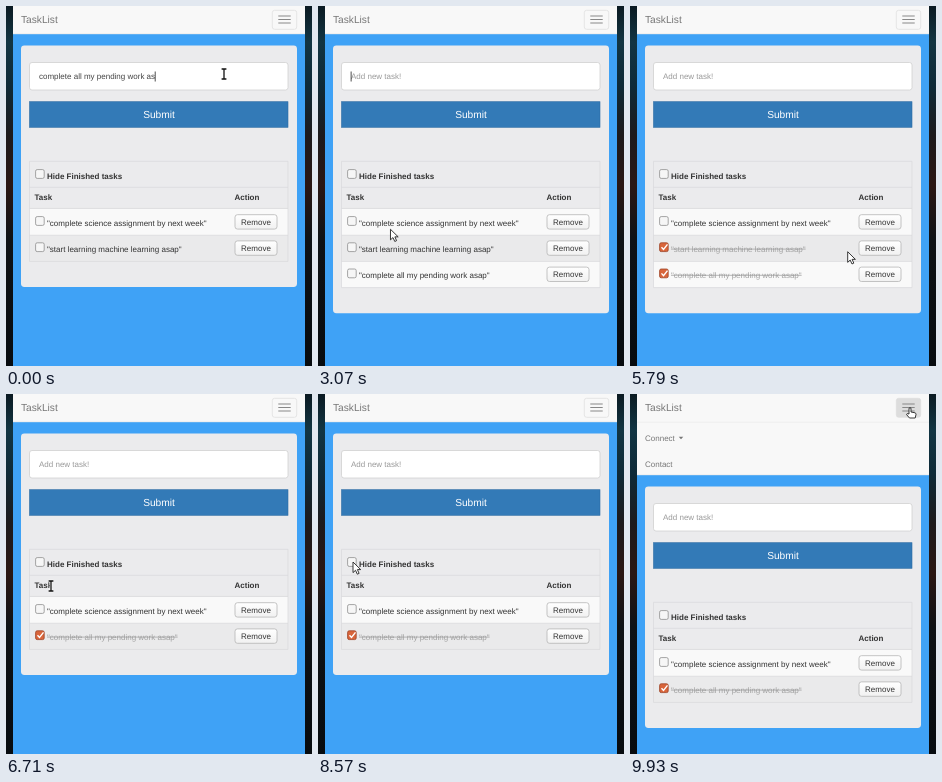
Recreate the animation shown at these times as an HTML page. Size 306 by 360 pixels, loop 10 s.

```html
<!DOCTYPE html>
<html lang="en">
<head>
<meta charset="utf-8">
<title>TaskList</title>
<style>
html, body { margin: 0; width: 100%; height: 100%; overflow: hidden; background: #0b1419; }
svg { display: block; width: 306px; height: 360px; }
text { font: 8px "Liberation Sans", Arial, sans-serif; fill: #333; text-rendering: geometricPrecision; white-space: pre; }
.big { font-size: 10.2px; }
.bold { font-weight: bold; }
.nav { fill: #777; }
</style>
</head>
<body>
<svg viewBox="0 0 306 360" xmlns="http://www.w3.org/2000/svg">
  <defs>
    <linearGradient id="sky" x1="0" y1="0" x2="0" y2="1">
      <stop offset="0" stop-color="#0b1a22"/>
      <stop offset=".1" stop-color="#123543"/>
      <stop offset=".22" stop-color="#0e2a38"/>
      <stop offset=".36" stop-color="#1d1a1c"/>
      <stop offset=".5" stop-color="#2a1714"/>
      <stop offset=".65" stop-color="#0e1216"/>
      <stop offset="1" stop-color="#070b0f"/>
    </linearGradient>
    <linearGradient id="btn" x1="0" y1="0" x2="0" y2="1">
      <stop offset="0" stop-color="#fff"/>
      <stop offset="1" stop-color="#f1f1f1"/>
    </linearGradient>
    <clipPath id="navClip"><rect id="navClipBox" x="7" y="0" width="292" height="28"/></clipPath>
  </defs>

  <rect width="306" height="360" fill="url(#sky)"/>
  <rect x="7" width="292" height="360" fill="#3fa2f6"/>

  <g id="page">
    <rect id="card" x="15" y="39.5" width="276" height="241.5" rx="3.4" fill="#ebebed"/>
    <rect x="23.5" y="56.5" width="258.5" height="27.5" rx="2.5" fill="#fff" stroke="#ccc" stroke-width=".7"/>
    <text id="entry" x="33" y="73"></text>
    <rect id="caret" y="65.5" width=".8" height="10" fill="#222"/>
    <rect x="23.5" y="95.7" width="258.5" height="25.6" fill="#337ab7" stroke="#2e6da4" stroke-width=".6"/>
    <text class="big" x="153" y="111.8" text-anchor="middle" style="fill:#fff">Submit</text>
    <text class="bold" x="41" y="172.7">Hide Finished tasks</text>
    <text class="bold" x="28.5" y="194">Task</text>
    <text class="bold" x="228.5" y="194">Action</text>
    <g id="rows"></g>
    <path id="grid" fill="none" stroke="#d9d9db" stroke-width=".7"/>
    <g id="hideBox"></g>
  </g>

  <rect id="navBar" x="7" width="292" height="28" fill="#f8f8f8"/>
  <rect id="navEdge" x="7" width="292" height=".6" fill="#e7e7e7"/>
  <text class="big nav" x="15" y="17">TaskList</text>
  <g clip-path="url(#navClip)">
    <path d="M7 28.2H299" stroke="#e7e7e7" stroke-width=".6"/>
    <text class="nav" x="15" y="46.6">Connect</text>
    <path d="M48.7 42.8h4.6l-2.3 2.4z" fill="#777"/>
    <text class="nav" x="15" y="73">Contact</text>
  </g>
  <rect id="toggle" x="266.3" y="4.3" width="24.4" height="19" rx="2.3" stroke="#ddd" stroke-width=".7"/>
  <path d="M272.3 10h12.4M272.3 13.5h12.4M272.3 17h12.4" stroke="#888" stroke-width="1.2"/>

  <g id="pointer">
    <path id="arrow" d="M0 0V10.6L2.5 8.3 4.3 12.2 6.1 11.4 4.4 7.6H7.7Z" fill="#fff" stroke="#222" stroke-width=".9" stroke-linejoin="round"/>
    <g id="beam" fill="none">
      <path d="M-2.4-5H2.4M0-5V5M-2.4 5H2.4" stroke="#fff" stroke-width="2.4"/>
      <path d="M-2.4-5H2.4M0-5V5M-2.4 5H2.4" stroke="#111" stroke-width="1.3"/>
    </g>
    <path id="hand" d="M-1 1Q-1-.5 0-.5T1 1V4L5 4.8Q6 5 6 6.5L5.2 10H-.5L-3.5 6.5Q-3.6 5-1 6Z" fill="#fff" stroke="#222" stroke-width=".9" stroke-linejoin="round"/>
  </g>
</svg>
<script>
const $ = id => document.getElementById(id);
const LOOP = 10000, ROW_TOP = 203, ROW = 26.2;
const FULL = "complete all my pending work asap";
const TASKS = ["complete science assignment by next week", "start learning machine learning asap", FULL];

// moments of user actions, ms
const AT = { a: 140, p: 320, enter: 640, blur: 3200, check2: 3900, check3: 4930,
             remove: 6100, hide: 7920, show: 8420, menu: 9640 };

// pointer stops: time, x, y
const STOPS = [
  [0, 218, 68], [1700, 218, 68], [2600, 110, 205], [3550, 34, 242], [4200, 34, 242],
  [4570, 44, 260], [4800, 35, 267], [5300, 35, 267], [5950, 250, 242], [6200, 250, 242],
  [6710, 45, 192], [7000, 38, 168.5], [7720, 38, 168.5], [7850, 35, 168], [8600, 35, 168],
  [9350, 282, 13], [9710, 282, 13], [9850, 280, 14], [LOOP, 280, 14]
];

const smooth = u => u * u * (3 - 2 * u);
const clamp = u => Math.max(0, Math.min(1, u));
const set = (el, attrs) => { for (const k in attrs) el.setAttribute(k, attrs[k]); };
const inside = (p, x0, y0, x1, y1) => p.x >= x0 && p.x <= x1 && p.y >= y0 && p.y <= y1;

function pointerAt(t) {
  let i = 1;
  while (i < STOPS.length - 1 && t > STOPS[i][0]) i++;
  const [t0, x0, y0] = STOPS[i - 1], [t1, x1, y1] = STOPS[i];
  const u = smooth(clamp((t - t0) / (t1 - t0)));
  return { x: x0 + (x1 - x0) * u, y: y0 + (y1 - y0) * u };
}

function checkbox(y, on) {
  const box = `<rect x="29.6" y="${y - 4.4}" width="8.6" height="8.8" rx="1.6" fill="${on ? "#d9653b" : "#f6f6f6"}" stroke="${on ? "#9c4527" : "#8e8e8e"}" stroke-width=".8"/>`;
  return on ? box + `<path d="M31.5 ${y}l2 2.2 4-5" fill="none" stroke="#fff" stroke-width="1.4"/>` : box;
}

const widths = {};
function widthOf(s) {
  if (!(s in widths)) {
    const old = $("entry").textContent;
    $("entry").textContent = s;
    widths[s] = s ? $("entry").getComputedTextLength() : 0;
    $("entry").textContent = old;
  }
  return widths[s];
}

function rowMarkup(task, i, hover) {
  const top = ROW_TOP + i * ROW, mid = top + 13;
  const label = `"${task.text}"`;
  const strike = task.done
    ? `<path d="M41 ${mid + .9}h${widthOf(label)}" stroke="#999" stroke-width=".7"/>` : "";
  return `<rect x="23.5" y="${top}" width="258.5" height="${ROW}" fill="${i % 2 ? "#eaeaeb" : "#f9f9f9"}"/>` +
    checkbox(mid - 1, task.done) +
    `<text x="41" y="${mid + 3.5}" style="fill:${task.done ? "#a2a2a2" : "#333"}">${label}</text>` + strike +
    `<rect x="229" y="${mid - 7.3}" width="42" height="14.4" rx="2.5" fill="${hover ? "#e6e6e6" : "url(#btn)"}" stroke="#b5b5b5" stroke-width=".8"/>` +
    `<text x="250" y="${mid + 2.6}" text-anchor="middle">Remove</text>`;
}

function cursorKind(p, count) {
  if (inside(p, 266, 4, 291, 23) || inside(p, 23, 95, 282, 121)) return "hand";
  if (inside(p, 23, 56, 282, 84) || inside(p, 28, 187, 47, 197)) return "beam";
  for (let i = 0; i < count; i++) {
    const mid = ROW_TOP + i * ROW + 13;
    if (inside(p, 229, mid - 7, 271, mid + 7)) return "hand";
    if (inside(p, 41, mid - 4, 172, mid + 5)) return "beam";
  }
  return "arrow";
}

let lastRows = "";
function draw(t) {
  const p = pointerAt(t);
  const hidden = t >= AT.hide && t < AT.show;

  const value = t >= AT.enter ? "" : FULL.slice(0, t < AT.a ? -2 : t < AT.p ? -1 : undefined);
  $("entry").textContent = value || "Add new task!";
  $("entry").style.fill = value ? "#444" : "#999";
  set($("caret"), { x: 33 + widthOf(value) - .3, visibility: t < AT.blur ? "visible" : "hidden" });

  const tasks = [
    { text: TASKS[0], live: true, done: false },
    { text: TASKS[1], live: t < AT.remove, done: t >= AT.check2 },
    { text: TASKS[2], live: t >= AT.enter, done: t >= AT.check3 }
  ].filter(k => k.live && !(hidden && k.done));
  const html = tasks.map((k, i) => {
    const mid = ROW_TOP + i * ROW + 13;
    return rowMarkup(k, i, inside(p, 229, mid - 7, 271, mid + 7));
  }).join("") + checkbox(168, hidden);
  if (html !== lastRows) $("rows").innerHTML = lastRows = html;

  const end = ROW_TOP + tasks.length * ROW;
  let lines = `M23.5 155.3H282V${end}H23.5ZM23.5 181.3H282M23.5 202.4H282`;
  for (let i = 1; i < tasks.length; i++) lines += `M23.5 ${ROW_TOP + i * ROW}H282`;
  set($("grid"), { d: lines });
  set($("card"), { height: end + 25.6 - 39.5 });

  const drop = 53 * smooth(clamp((t - AT.menu) / 280));
  set($("page"), { transform: `translate(0 ${drop})` });
  set($("navBar"), { height: 28 + drop });
  set($("navEdge"), { y: 27.6 + drop });
  set($("navClipBox"), { height: 28 + drop });
  set($("toggle"), { fill: inside(p, 266, 4, 291, 23) ? "#ddd" : "#f8f8f8" });

  const kind = cursorKind(p, tasks.length);
  for (const id of ["arrow", "beam", "hand"]) $(id).style.display = id === kind ? "" : "none";
  set($("pointer"), { transform: `translate(${p.x} ${p.y})` });
}

const start = performance.now();
function tick() {
  draw((performance.now() - start) % LOOP);
  requestAnimationFrame(tick);
}
draw(0);
requestAnimationFrame(tick);
</script>
</body>
</html>
```
